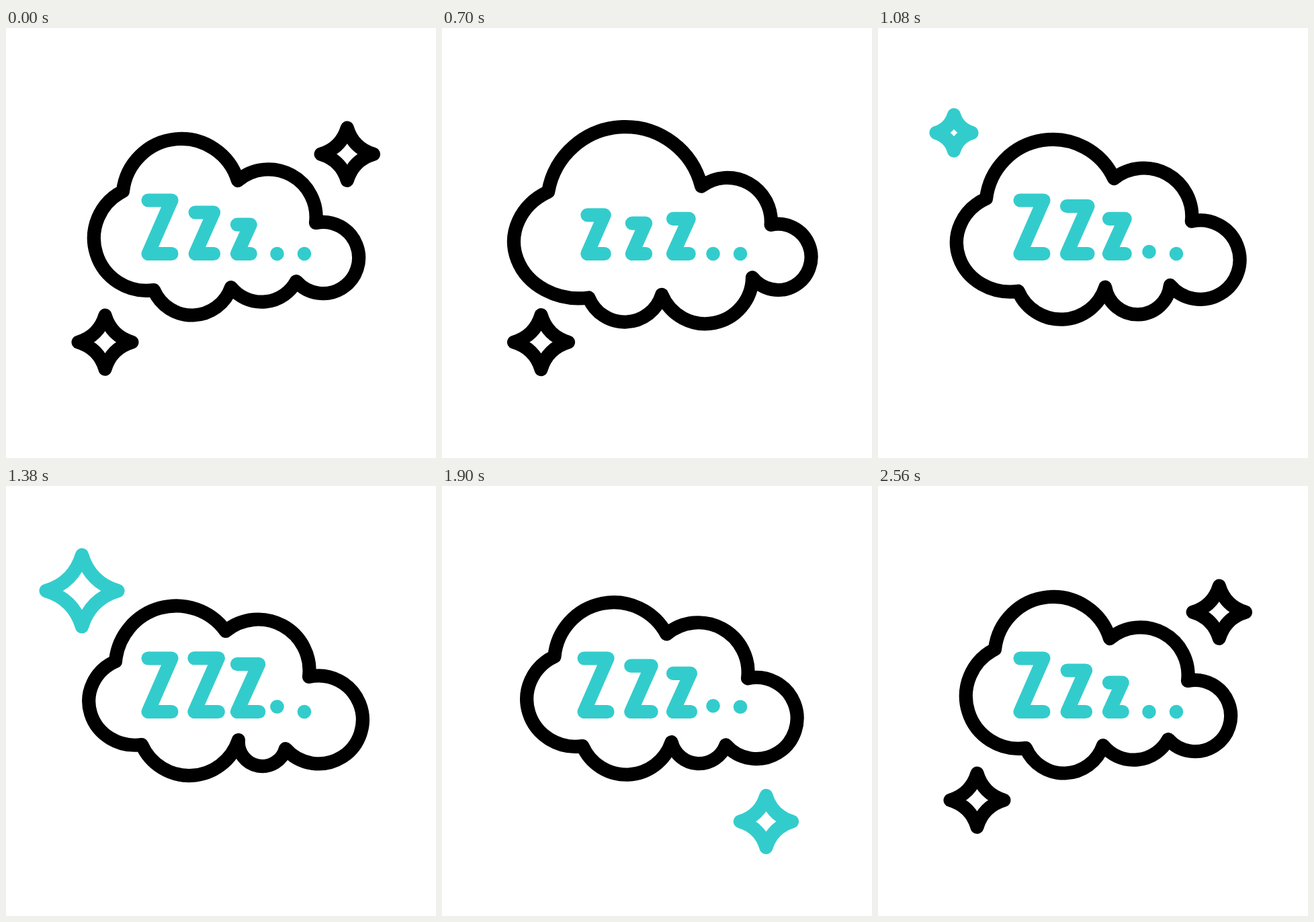
An HTML page for the animation above (2700 ms loop, 640x640 px).

```html
<!DOCTYPE html>
<html lang="en">
<head>
<meta charset="utf-8">
<title>Sleep cloud</title>
<style>
  html, body { margin: 0; width: 100%; height: 100%; overflow: hidden; background: #fff; }
  svg { display: block; width: 100%; height: 100%; }
  path { fill: none; stroke: #000; stroke-width: 20.2; stroke-linecap: round; stroke-linejoin: round; }
  path.teal { stroke: #3cc; }
  circle { fill: #3cc; }
</style>
</head>
<body>
<svg id="stage" viewBox="0 0 640 640"></svg>
<script>
const LOOP = 2700, START = 120, BASE = 336;
const stage = document.getElementById('stage');

function add(tag, attrs) {
  const el = document.createElementNS('http://www.w3.org/2000/svg', tag);
  for (const name in attrs) el.setAttribute(name, attrs[name]);
  return stage.appendChild(el);
}

const clamp = v => Math.min(1, Math.max(0, v));
const ramp = (t, from, to) => clamp((t - from) / (to - from));
// Triangular rise and fall around a peak time.
const bump = (t, peak, width, amount) => amount * clamp(1 - Math.abs(t - peak) / width);
const bumps = (t, list) => list.reduce((sum, b) => sum + bump(t, ...b), 0);

// Cloud poses: x, y of each joint and the bulge of the lobe after it, clockwise.
const rest = [[174, 243, 70], [345, 227, 45], [461, 290, 80], [432, 377, 26], [335, 386, 39.5], [220, 390, 65.5]];
const wide = [[157, 240, 100], [399, 240, 36], [498, 295, 70], [472, 367, 61], [323, 401, 36], [222, 405, 73]];
const slim = [[163, 261, 59], [327, 216, 48], [451, 284, 99], [416, 391, 32.5], [346, 378, 49.5], [202, 385, 56]];

function cloudPath(t) {
  const turn = ramp(t, 560, 1345);
  const w = ramp(t, START, 560) * (1 - turn);
  const s = turn * (1 - ramp(t, 1700, 2200));
  const joints = rest.map((p, i) => p.map((v, j) => v + w * (wide[i][j] - v) + s * (slim[i][j] - v)));
  let d = `M${joints[0][0]} ${joints[0][1]}`;
  joints.forEach(([x, y, bulge], i) => {
    const [nx, ny] = joints[(i + 1) % 6];
    const stretch = i === 5 ? 1 + 0.17 * w + 0.05 * s : 1;
    const half = Math.hypot((nx - x) / stretch, ny - y) / 2;
    const r = (half * half + bulge * bulge) / (2 * bulge);
    d += `A${r * stretch} ${r} 0 ${bulge > half ? 1 : 0} 1 ${nx} ${ny}`;
  });
  return d + 'Z';
}

// Stars pulse evenly between two sizes; `back` delays the next life of the black ones.
const MIN = 33, MAX = 64;
const stars = [
  { x: 507.8, y: 187.8, peak: 275, span: 325, dies: 600, back: 2047 },
  { x: 147.5, y: 467.6, peak: 250, span: 288, dies: 1050, back: 2265 },
  { x: 113, y: 156, peak: 1376, span: 334, dies: 1710, teal: true },
  { x: 482.4, y: 499.4, peak: 1740, span: 325, dies: 2065, teal: true }
];

function starState({ peak, span, dies, back }, t) {
  let age = t;
  if (back) age = t > dies ? Math.min(t - back, START) : Math.max(t, START);
  const beat = Math.abs(age - peak) / span % 2;
  return {
    radius: MAX - (MAX - MIN) * (1 - Math.abs(1 - beat)),
    alpha: ramp(age, peak - span, peak - span + 30) * ramp(age, dies, dies - 60)
  };
}

function starPath(x, y, radius) {
  const r = radius - 10.1, c = r * 0.23;
  return `M${x} ${y - r}q${c} ${r - c} ${r} ${r}q${c - r} ${c} ${-r} ${r}` +
    `q${-c} ${c - r} ${-r} ${-r}q${r - c} ${-c} ${r} ${-r}Z`;
}

// Letters scale about (x, BASE) while the line weight stays the same.
const letters = [
  { x: 229, left: -17.4, right: 17.4, h: 79.5, moves: [[670, 360, -0.3]] },
  { x: 286, left: -4.3, right: 23, h: 61.5, moves: [[410, 290, 0.24], [720, 280, -0.28], [1450, 680, 0.33]] },
  { x: 344, left: 0, right: 19.7, h: 43.4, moves: [[500, 400, 0.4], [1530, 590, 0.85]] }
];

function letterPath({ x, left, right, h, moves }, t) {
  const scale = 1 + bumps(t, moves);
  const a = x + left * scale, b = x + right * scale;
  return `M${a} ${BASE - h * scale}H${b}L${a} ${BASE}H${b}`;
}

const dots = [
  { x: 403.5, moves: [[1680, 800, 12]] },
  { x: 444, moves: [[1880, 220, 8]] }
];

for (const s of stars) s.el = add('path', { class: s.teal ? 'teal' : 'ink' });
const cloud = add('path', {});
for (const l of letters) l.el = add('path', { class: 'teal' });
for (const d of dots) d.el = add('circle', { cx: d.x, r: 10.3 });

function draw(t) {
  cloud.setAttribute('d', cloudPath(t));
  for (const s of stars) {
    const { radius, alpha } = starState(s, t);
    s.el.setAttribute('d', starPath(s.x, s.y, radius));
    s.el.setAttribute('opacity', alpha);
  }
  for (const l of letters) l.el.setAttribute('d', letterPath(l, t));
  for (const d of dots) d.el.setAttribute('cy', BASE - bumps(t, d.moves));
}

const start = performance.now();
function tick() {
  draw((performance.now() - start) % LOOP);
  requestAnimationFrame(tick);
}
tick();
</script>
</body>
</html>
```
